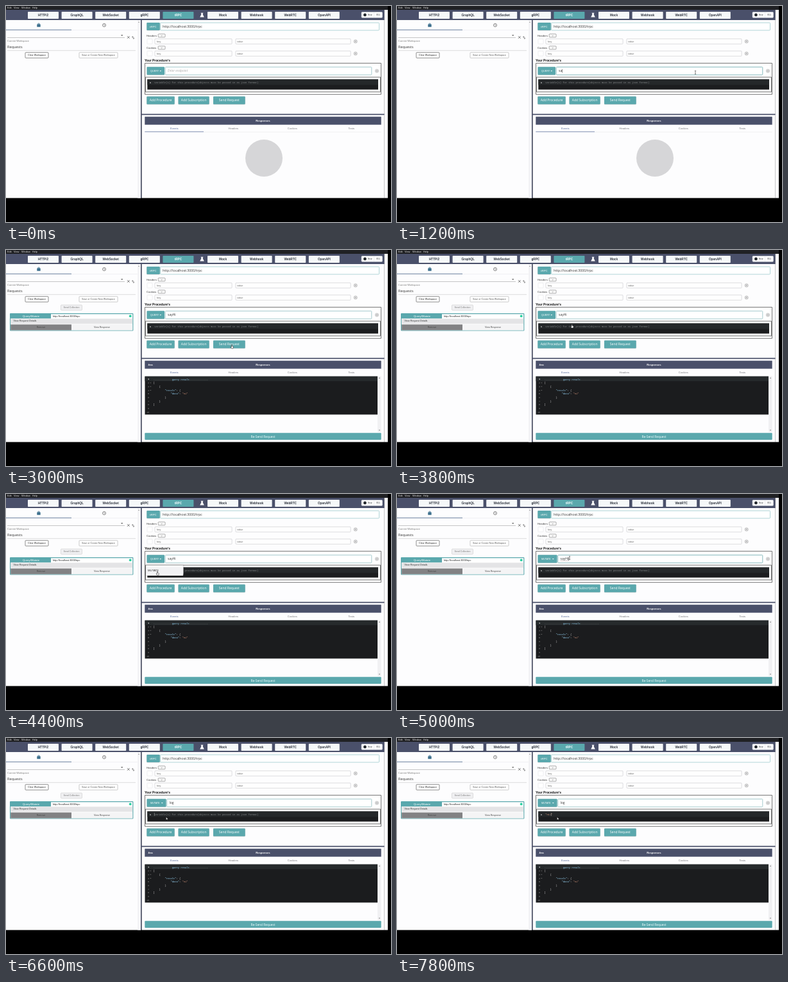
These frames come from a looping animation (600x338 px, 8 s). An HTML page with a canvas:

```html
<!DOCTYPE html>
<html lang="en">
<head>
<meta charset="utf-8">
<title>tRPC request demo</title>
<style>
html, body { margin: 0; width: 100%; height: 100%; overflow: hidden; background: #000; }
canvas { display: block; width: 600px; height: 338px; }
</style>
</head>
<body>
<canvas id="stage"></canvas>
<script>
const LOOP = 8000, STEP = 200;
const TEAL = '#5aa8ad', SLATE = '#4a506a', INK = '#333', PAPER = '#fdfdfe';
const RIGHT = 589.7, BOTTOM = 300.6;
const ARIAL = '"Liberation Sans", Arial, sans-serif';
const HUMAN = '"Open Sans", "Noto Sans", sans-serif';
const MONO = '"Liberation Mono", "DejaVu Sans Mono", monospace';
const CHAR = 2.25;

const canvas = document.getElementById('stage');
const ctx = canvas.getContext('2d');
const dpr = window.devicePixelRatio || 1;
canvas.width = 600 * dpr;
canvas.height = 338 * dpr;

function box(x, y, x2, y2, fill, stroke, r = 0, lw = 0.6) {
  ctx.beginPath();
  ctx.roundRect(x, y, x2 - x, y2 - y, r);
  if (fill) { ctx.fillStyle = fill; ctx.fill(); }
  if (stroke) { ctx.strokeStyle = stroke; ctx.lineWidth = lw; ctx.stroke(); }
}

function line(points, color, lw = 0.6) {
  ctx.beginPath();
  points.forEach(([x, y], i) => i ? ctx.lineTo(x, y) : ctx.moveTo(x, y));
  ctx.strokeStyle = color;
  ctx.lineWidth = lw;
  ctx.stroke();
}

function shape(points, fill, stroke, lw = 0.5) {
  ctx.beginPath();
  points.forEach(([x, y]) => ctx.lineTo(x, y));
  ctx.closePath();
  ctx.fillStyle = fill;
  ctx.fill();
  if (stroke) { ctx.strokeStyle = stroke; ctx.lineWidth = lw; ctx.stroke(); }
}

function disc(x, y, r, fill, stroke, lw = 0.6) {
  ctx.beginPath();
  ctx.arc(x, y, r, 0, 7);
  if (fill) { ctx.fillStyle = fill; ctx.fill(); }
  if (stroke) { ctx.strokeStyle = stroke; ctx.lineWidth = lw; ctx.stroke(); }
}

// y is the middle of the capitals; returns the text width
function text(s, x, y, size, color = INK, align = 'left', family = ARIAL, style = '') {
  ctx.font = `${style} ${size}px ${family}`;
  ctx.textAlign = align;
  ctx.fillStyle = color;
  ctx.fillText(s, x, y + size * 0.36);
  return ctx.measureText(s).width;
}

function code(s, col, y, color) {
  text(s, 229.5 + col * CHAR, y, CHAR / 0.6, color, 'left', MONO);
}

function button(label, x, y, x2, y2, size, family = HUMAN, hover = false) {
  ctx.save();
  ctx.shadowColor = hover ? 'rgba(0,0,0,.7)' : 'rgba(0,0,0,.2)';
  ctx.shadowBlur = (hover ? 2 : 1) * dpr;
  ctx.shadowOffsetY = 0.4 * dpr;
  box(x, y, x2, y2, TEAL, null, 1);
  ctx.restore();
  text(label, (x + x2) / 2, (y + y2) / 2, size, '#fff', 'center', family);
}

function outlined(label, x, y, x2, y2, color, edge) {
  box(x, y, x2, y2, '#fff', edge, 1);
  text(label, (x + x2) / 2, (y + y2) / 2, 3.65, color, 'center');
}

function closeIcon(x, y) {
  disc(x, y, 2.7, '#dededf', '#aaa', 0.5);
  line([[x - 1, y - 1], [x + 1, y + 1]], '#888', 0.5);
  line([[x - 1, y + 1], [x + 1, y - 1]], '#888', 0.5);
}

function topBar() {
  box(0, 0, 595, 6, '#202124');
  [['Edit', 2], ['View', 12], ['Window', 24], ['Help', 41]]
    .forEach(([s, x]) => text(s, x, 3, 3.9, '#e2e2e2'));
  box(0, 6, RIGHT, 22, SLATE);

  const tabs = ['HTTP/2', 'GraphQL', 'WebSocket', 'gRPC', 'tRPC', 'Mock', 'Webhook', 'WebRTC', 'OpenAPI'];
  tabs.forEach((name, i) => {
    const x = 34 + i * 52.6 + (i > 4 ? 17 : 0), on = name === 'tRPC';
    box(x, 9, x + 48, 20, on ? TEAL : '#f5f8f9', null, 0.8);
    text(name, x + 24, 14.4, 4.7, on ? '#f4ffff' : '#30343f', 'center', ARIAL, 'bold');
  });
  shape([[304.2, 11], [306.8, 11], [306.8, 13.4], [308.8, 17.6], [302.2, 17.6], [304.2, 13.4]], '#fff');
  line([[303.6, 11], [307.4, 11]], '#fff');

  box(554, 9.5, 586.5, 18.3, '#fff', '#d5d8df', 1.2);
  line([[573.5, 9.5], [573.5, 18.3]], '#cfd2d8', 0.5);
  disc(559.4, 13.9, 2.4, '#24292f');
  text('Star', 563.6, 13.9, 4, '#3a3f45');
  text('951', 580, 13.9, 3.7, '#3a3f45', 'center');
}

function sidebar(sent) {
  box(0, 22, 210, BOTTOM, PAPER);
  box(205, 22, 210, BOTTOM, '#f4f4f6');
  shape([[206, 26], [208, 26], [207, 24.6]], '#888');
  box(48.3, 28.4, 53.7, 32.8, '#3c6f8d', null, 0.5);
  box(49.8, 27.2, 52.2, 29, null, '#3c6f8d', 0.3, 0.7);
  disc(153, 30, 2.5, null, '#555', 0.7);
  line([[153, 28.4], [153, 30.2], [154.2, 31]], '#555', 0.5);
  line([[102, 37.7], [205, 37.7]], '#e2e2e6', 0.5);
  line([[0, 37.4], [102, 37.4]], '#5c7394', 0.9);

  shape([[179, 45.2], [182.4, 45.2], [180.7, 47]], '#555');
  line([[2, 49.5], [185, 49.5]], '#8c8c8c', 0.5);
  line([[189, 47.2], [192.6, 50.8]], '#444', 0.7);
  line([[189, 50.8], [192.6, 47.2]], '#444', 0.7);
  line([[196.2, 49], [197.3, 47.5], [198.4, 49]], '#555', 0.5);
  line([[197.3, 47.5], [197.3, 50]], '#555', 0.5);
  line([[197.8, 50], [198.9, 51.5], [200, 50]], '#555', 0.5);
  line([[198.9, 51.5], [198.9, 48.8]], '#555', 0.5);
  text('Current Workspace', 2, 54.5, 3.95, '#777');
  text('Requests', 2, 63.8, 5.5, INK, 'left', HUMAN);
  line([[2, 69.7], [202, 69.7]], '#bbb', 0.5);
  outlined('Clear Workspace', 30, 72.7, 66, 81.3, '#222', '#444');
  outlined('Save or Create New Workspace', 114, 72.7, 174, 81.3, '#555', '#aaa');
  if (!sent) return;

  box(85.5, 86, 118.5, 94.3, '#f0f0f2', '#ccc', 1);
  text('Send Collection', 102, 90.2, 3.6, '#777', 'center');
  box(6.6, 99.6, 197.8, 126, '#fff', TEAL, 0.5, 1.2);
  box(7, 100, 70, 107.3, TEAL);
  text('Query/Mutate', 39, 103.4, 4.3, '#fff', 'center');
  text('http://localhost:3000/trpc', 73, 103.3, 3.9, '#222');
  disc(193.7, 103.4, 1.9, '#2bd0a0');
  box(7.2, 107.5, 197.2, 115.6, '#e4e4e6');
  text('View Request Details', 11.5, 111, 3.8, '#333');
  box(7.2, 116.4, 102, 125.5, '#828284');
  text('Remove', 54.5, 121, 3.7, '#444', 'center');
  box(102, 116.4, 197.2, 125.5, '#f4f4f5');
  text('View Response', 149.5, 121, 3.6, '#444', 'center');
}

function fieldRows(label, y) {
  text(label, 219, y, 4.2, '#333');
  box(237.2, y - 2.6, 248, y + 2.4, '#fff', '#555', 0.8, 0.5);
  line([[241.4, y - 0.4], [242.6, y + 0.5], [243.8, y - 0.4]], '#444', 0.5);
  const m = y + 9;
  box(220, m - 3.8, 228, m + 3.8, '#fff', '#dcdce0', 0.5, 0.5);
  box(232, m - 4, 352, m + 4, '#fff', '#b8b8bd', 0.8, 0.5);
  box(358, m - 4, 537, m + 4, '#fff', '#b8b8bd', 0.8, 0.5);
  text('key', 235, m, 4, '#666');
  text('value', 360, m, 4, '#666');
  closeIcon(544.7, m);
}

function composer(s) {
  box(212, 22, RIGHT, 169, PAPER);
  button('tRPC', 219.3, 26, 239.7, 38, 4.4, ARIAL);
  box(240.5, 26.2, 581.5, 38, '#fff', '#9ccbcd', 1, 0.8);
  text('http://localhost:3000/trpc', 244, 32.3, 5.2, INK, 'left', HUMAN);
  fieldRows('Headers', 46.4);
  fieldRows('Cookies', 65.4);
  text("Your Procedure's", 216, 85, 4.85, '#111', 'left', ARIAL, 'bold');

  box(216.5, 89.5, 584.5, 138.3, '#fff', '#555', 0, 0.8);
  const edge = s.method === 'QUERY' ? 247 : 249.5;
  button('', 219.5, 95.3, edge, 107.8, 4);
  text(s.method, 225, 101.6, 3.75, '#fff');
  shape([[edge - 7.6, 100.9], [edge - 4.8, 100.9], [edge - 6.2, 102.4]], '#fff');
  box(edge + 1.2, 95.5, 569.8, 107.8, '#fff', s.focus === 'path' ? '#7ab3b7' : '#9cc6c9', 1, 0.9);
  const x = edge + 5;
  let w = 0;
  if (s.path) w = text(s.path, x, 101.6, 5, INK, 'left', HUMAN);
  else text('Enter endpoint', x, 101.6, 4.8, '#aaa', 'left', HUMAN, 'italic');
  if (s.focus === 'path') {
    line([[x + w + 0.3, 98.8], [x + w + 0.3, 104.5]], '#222', 0.5);
    if (s.path.length > 2) line([[x, 104.6], [x + w, 104.6]], '#b09a9a', 0.5);
  }
  closeIcon(578, 101.6);

  box(217.5, 111.3, 583.5, 134.4, '#fff', '#555', 0, 0.8);
  box(220.3, 114.8, 580, 130.8, '#1c1d1f');
  box(220.3, 114.8, 580, 123.4, '#25282a');
  text('1', 224.8, 119.2, 3.9, '#f2f2f2', 'center', MONO, 'bold');
  if (s.body) code(s.body, 0.8, 119.2, '#ce9178');
  else code('Variable(s) for this procedure(objects must be passed in as json format)', 0.8, 119.2, '#87898b');
  if (s.focus === 'body') {
    const c = 231.3 + (s.body.length - (s.body.length > 1 ? 1 : 0)) * CHAR;
    line([[c, 117], [c, 122]], '#ddd', 0.4);
  }

  button('Add Procedure', 219.3, 141.5, 262.7, 153.8, 5);
  button('Add Subscription', 268.5, 141.5, 316.7, 153.8, 5);
  button('Send Request', 323, 141.5, 372.7, 153.8, 5, HUMAN, s.hover);

  if (s.menu) {
    ctx.save();
    ctx.shadowColor = 'rgba(0,0,0,.4)';
    ctx.shadowBlur = 3 * dpr;
    box(218, 111.5, 276.3, 127.7, '#fbfbfc', null, 1);
    ctx.restore();
    box(218, 114.5, 276.3, 124.7, '#f2f2f4');
    text('MUTATE', 221, 119.8, 4.3, '#333');
  }
}

function response(sent) {
  box(212, 170, RIGHT, BOTTOM, PAPER);
  box(216.3, 173.2, 584.7, 185.7, SLATE);
  text('Responses', 400.3, 179.4, 4.2, '#fff', 'center', ARIAL, 'bold');
  ['Events', 'Headers', 'Cookies', 'Tests'].forEach((s, i) =>
    text(s, 262.3 + i * 92, 191.4, 4.2, i ? '#77777d' : '#566a9c', 'center'));
  if (!sent) {
    line([[308, 197.2], [584.7, 197.2]], '#e0e0e5', 0.5);
    line([[216.3, 196.8], [308, 196.8]], '#6f80a8', 0.9);
    disc(402, 238, 29, '#d6d6d8');
    return;
  }
  text('4ms', 221.5, 179.9, 3.7, '#fff', 'left', ARIAL, 'bold');

  box(579, 197.5, 584.7, 285, '#f1f1f3');
  shape([[580.8, 201], [583.2, 201], [582, 199.5]], '#777');
  shape([[580.8, 281.5], [583.2, 281.5], [582, 283]], '#777');
  box(216.5, 197.8, 579, 257.5, '#1b1c1e');
  box(216.5, 197.8, 579, 205.2, '#262a2c');
  const row = n => 202.2 + (n - 1) * 5.7;
  for (let n = 1; n <= 10; n++) {
    text(n, 223.2, row(n), 3.6, n === 1 ? '#eee' : '#858585', 'right', MONO, n === 1 ? 'bold' : '');
    if (n > 1 && n < 5) shape([[224.4, row(n) - 0.3], [226.4, row(n) - 0.3], [225.4, row(n) + 0.9]], '#777');
  }
  const dashes = '-'.repeat(13), pale = '#d4d4d4', sky = '#9cdcfe';
  code(dashes, 0, row(1), '#9a9a9a');
  code('Query result', 13, row(1), sky);
  code(dashes, 25, row(1), '#9a9a9a');
  code('[', 0, row(2), pale);
  code('{', 4, row(3), pale);
  code('"result"', 8, row(4), sky);
  code(': {', 16, row(4), pale);
  code('"data"', 12, row(5), sky);
  code(':', 18, row(5), pale);
  code('"Hi"', 20, row(5), '#ce9178');
  code('}', 8, row(6), pale);
  code('}', 4, row(7), pale);
  code(']', 0, row(8), pale);
  box(216.3, 286.2, 584.7, 297, TEAL, null, 1);
  text('Re-Send Request', 400.5, 291.8, 4.8, '#f2ffff', 'center', HUMAN);
}

function dividers() {
  box(210, 22, 211.6, BOTTOM, SLATE);
  box(211.6, 22, 212, BOTTOM, PAPER);
  box(211, 168.8, RIGHT, 170.5, SLATE);
  box(RIGHT, 6, 595, BOTTOM, '#fcfcfd');
}

// pointer stops: time, x, y
const STOPS = [
  [200, 500, 172], [600, 465, 104], [2200, 465, 104], [2600, 384, 144], [2800, 357, 153],
  [3000, 352, 151], [3400, 352, 151], [4000, 233, 103], [4200, 233, 106], [4400, 236, 124],
  [4600, 236, 124], [5000, 269, 100], [6000, 269, 100], [6600, 250.5, 126], [LOOP, 250.5, 126]
];

function pointerAt(t) {
  if (t < STOPS[0][0]) return null;
  const i = STOPS.findIndex(p => p[0] > t);
  const [t0, x0, y0] = STOPS[i - 1], [t1, x1, y1] = STOPS[i];
  const k = (t - t0) / (t1 - t0);
  return [x0 + (x1 - x0) * k, y0 + (y1 - y0) * k];
}

function drawPointer(x, y, t) {
  const overPath = y > 95 && y < 108 && x > 251 && x < 570;
  if (overPath) {
    line([[x, y - 2.5], [x, y + 2.5]], '#222', 0.6);
    line([[x - 1.2, y - 2.6], [x + 1.2, y - 2.6]], '#222', 0.5);
    line([[x - 1.2, y + 2.6], [x + 1.2, y + 2.6]], '#222', 0.5);
  } else if (t >= 2800 && t < 4800) {
    shape([[x - 0.6, y - 2.6], [x + 0.5, y - 2.6], [x + 0.6, y - 0.4], [x + 2.4, y + 0.3],
      [x + 2, y + 3], [x - 0.6, y + 3], [x - 2, y + 0.8], [x - 0.6, y + 0.8]], '#fff', '#111');
  } else {
    shape([[x - 1, y - 2.2], [x - 1, y + 2], [x, y + 1.2], [x + 0.7, y + 2.6],
      [x + 1.3, y + 2.3], [x + 0.7, y + 1], [x + 2, y + 1]], '#fff', '#111', 0.4);
  }
}

// number of letters typed when the first one lands at `start`
const typed = (word, t, start) => word.slice(0, Math.max(0, Math.floor((t - start) / STEP) + 1));

function stateAt(t) {
  const path = t < 5200 ? typed('sayHi', t, 1000) : typed('log', t, 5400);
  const body = t < 7200 ? '' : t < 7600 ? '""' : t < 7800 ? '"Hi"' : '"Hi!"';
  let focus = '';
  if (t >= 600 && t < 3000 || t >= 5000 && t < 6400) focus = 'path';
  if (t >= 6600) focus = 'body';
  return {
    path, body, focus,
    method: t < 4600 ? 'QUERY' : 'MUTATE',
    menu: t >= 4200 && t < 4600,
    hover: t >= 2800 && t < 3000,
    sent: t >= 3000
  };
}

function draw(now) {
  const t = Math.floor((now % LOOP) / STEP) * STEP;
  const s = stateAt(t);
  ctx.setTransform(dpr, 0, 0, dpr, 0, 0);
  ctx.fillStyle = '#000';
  ctx.fillRect(0, 0, 600, 338);
  topBar();
  sidebar(s.sent);
  composer(s);
  response(s.sent);
  dividers();
  const p = pointerAt(t);
  if (p) drawPointer(p[0], p[1], t);
}

const began = performance.now();
function tick() {
  draw(performance.now() - began);
  requestAnimationFrame(tick);
}
tick();
</script>
</body>
</html>
```
